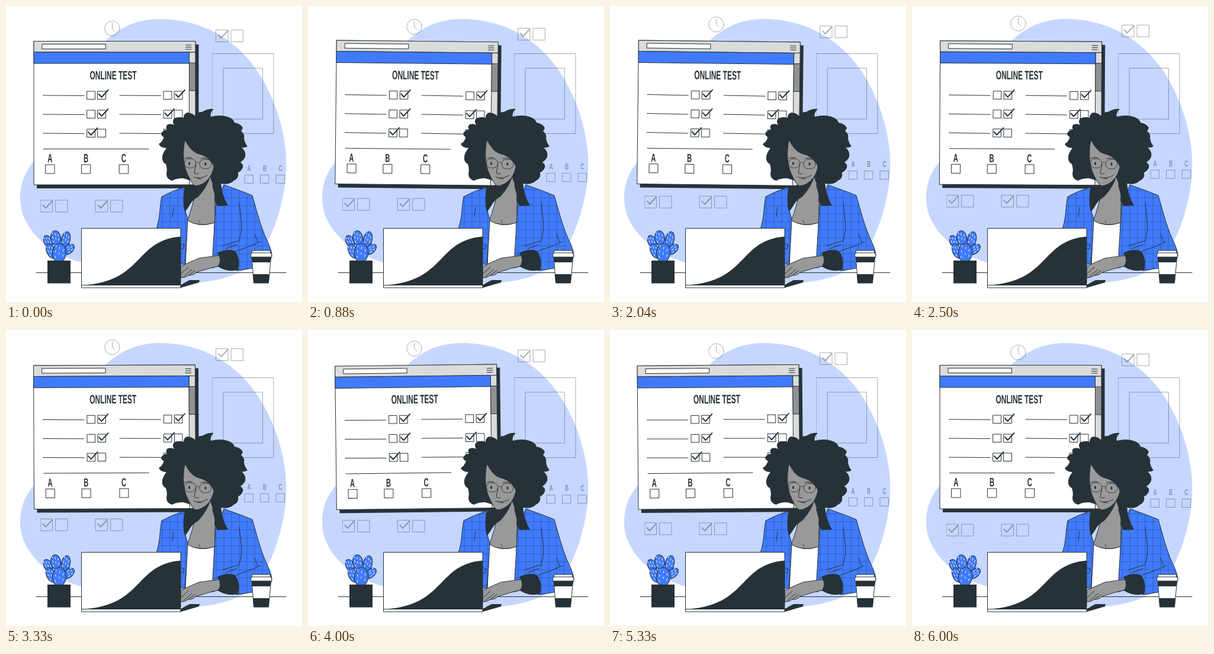
An HTML page for the animation above (6.04 s loop, 500x500 px).

```html
<!DOCTYPE html>
<html lang="en">
<head>
<meta charset="utf-8">
<title>Online test</title>
<style>
html, body { margin: 0; width: 100%; height: 100%; overflow: hidden; background: #fff; }
svg { display: block; width: 100vw; height: 100vh; }
text { font-family: "Liberation Sans", Arial, sans-serif; font-weight: bold; text-anchor: middle; }
.line { fill: none; stroke: #263238; stroke-linecap: round; stroke-linejoin: round; }
.edge { stroke: #263238; stroke-linejoin: round; }
.ink { fill: #263238; }
.skin { fill: #999; }
.blue { fill: #407bff; }
.white { fill: #fff; }
.gray { fill: #dbdbdb; }
.faint { opacity: .4; }
</style>
</head>
<body>
<svg viewBox="0 0 500 500">
  <defs>
    <pattern id="plaid" width="13" height="13.5" x="258" y="317" patternUnits="userSpaceOnUse">
      <rect width="13" height="13.5" fill="#407bff"/>
      <path d="M6 0V13.5M0 7H13" stroke="#263238" stroke-width=".7" opacity=".55"/>
    </pattern>
  </defs>

  <path fill="#c6d7ff" d="M260 22C335 22 398 61 434 125C465 180 476 238 473 282C470 333 451 391 426 425C404 454 355 469 294 468C225 467 170 447 127 433C78 420 24 379 24 325C24 294 36 274 52 257C88 225 125 185 134 128C141 83 163 61 181 48C205 30 230 22 260 22Z"/>

  <g class="line faint">
    <rect x="348.5" y="80.5" width="103.5" height="135"/>
    <rect x="367.5" y="105" width="66" height="86"/>
  </g>
  <g id="floating" class="faint">
    <g class="line">
      <circle cx="179.5" cy="38" r="12.7"/>
      <path d="M179.5 29V38L184 42.5"/>
    </g>
  </g>
  <path class="line" d="M51 450.5H473"/>

  <g id="window">
    <path class="ink" d="M52 65H325.500V308H52Z"/>
    <path class="white edge" d="M47 59.500H320V302H47Z"/>
    <path class="gray edge" d="M309.500 78H320V302H309.500Z"/>
    <path class="edge" fill="#919191" d="M309.500 96H320V143H309.500Z"/>
    <path class="gray edge" d="M47 59.500H320V78H47Z"/>
    <path class="blue edge" d="M47 78H309.500V97H47Z"/>
    <path class="white edge" d="M61 64.500H168.500V72.500H61Z"/>
    <path class="line" d="M303.500 66H313M303.500 69.500H313M303.500 73H313M63.500 241.500H241"/>
  </g>

  <g id="plant">
    <g id="leaves"></g>
    <path class="ink" d="M70 430H109V468.500H70Z"/>
  </g>

  <g id="person">
    <path class="ink" d="M299 291Q287 291 281 295Q271 293 271 283Q273 276 270 267Q263 264 264 254Q265 248 271 240Q261 240 258 233Q264 230 267 221Q262 220 262 215Q266 209 272 209Q269 203 273 200Q280 198 284 201Q280 194 284 190Q293 186 300 189Q300 182 306 180Q314 180 320 186Q323 178 331 179Q341 173 351 174Q344 180 346 187Q362 183 374 187Q384 190 386 197Q397 199 400 206Q399 209 397 211Q404 217 402 223Q403 231 408 237Q403 240 398 239Q406 246 404 255Q401 261 396 264Q403 269 399 275Q396 280 392 281Q394 291 385 295Q377 303 363 300L352 306L330 300Z"/>
    <path class="skin edge" d="M343 283L353 310V366Q328 374 306 363Q315 340 323 303Z"/>
    <path class="white edge" d="M306 362Q327 375 352 366V442H303Z"/>
    <g class="edge" fill="url(#plaid)">
      <path d="M301 306Q279 313 263 322C259 340 261 358 253 379L294 436H302L305 400L307 360L301 340Z"/>
      <path d="M368 302Q399 313 416 320C424 347 429 369 440 394Q448 410 449 420C449 431 436 437 421 442Q406 445 390 447L382 440H351L349 421L354 336Z"/>
    </g>
    <path class="line" d="M283 340L281 356M394 333L397 360Q400 378 393 398M420 385L425 399M389 414Q411 407 430 398M366 405L392 397M371 410L390 403M277 398L301 403L299 411L284 405"/>
    <path class="ink" d="M320 301L302 307Q297 326 302 348Q310 339 316 324L328 313Z"/>
    <path class="ink" d="M318 302Q336 299 346 285Q341 305 325 322Q313 329 308 340Z"/>
    <path class="ink" d="M348 302L363 298Q365 321 375 337L358 338Q350 331 353 321Z"/>
    <path class="skin edge" d="M302 227C298 247 299 270 307 285Q314 301 320 304Q333 303 343 291Q351 280 353 262Z"/>
    <path class="ink" d="M300 222L303 228Q311 244 322 249Q341 254 347 264Q355 275 351 299L378 285L378 220Z"/>
    <g class="line">
      <path d="M302 258Q308 254 314 257M329 258Q335 255 342 259M321 267L318 282Q321 285 325 283M317 289Q329 293 340 286M323 291L330 292"/>
      <g stroke-width=".8">
        <rect x="301.500" y="258" width="19" height="15.500" rx="7.500"/>
        <rect x="327" y="259" width="20" height="16" rx="8"/>
        <path d="M320.500 265Q324 262 327 266M347 265L354 264M328 367L326 362"/>
      </g>
    </g>
    <ellipse class="ink" cx="309.500" cy="266" rx="1.500" ry="2.800"/>
    <ellipse class="ink" cx="337" cy="267" rx="1.500" ry="2.800"/>
  </g>

  <g id="laptop">
    <path class="ink" d="M295 471L310 463H327L326 467L295 476Z"/>
    <path class="skin edge" d="M363 421Q340 424 326 426Q309 433 295 440V459Q302 460 308 455Q315 456 321 450Q341 443 365 438Z"/>
    <path class="line" d="M296 452L308 441M300 457L314 445M308 455L319 447"/>
    <path class="ink" d="M357 417Q374 409 387 414Q397 428 392 446Q372 450 358 440Q365 429 357 417Z"/>
    <path class="white edge" d="M127.500 375.500H295V476H127.500Z"/>
    <path class="ink" d="M130 471.500C232 466 218 395 295 389.500V471.500Z"/>
    <path class="line" d="M127.500 471.500H295"/>
  </g>

  <g id="cup">
    <path class="white edge" d="M415 421L418.500 468H443.500L448 421Z"/>
    <path class="ink" d="M415 424H447.500L446.500 433H416ZM417 453H445L443.500 468H418.500Z"/>
    <path class="white edge" d="M416 413H446L447 417Q449 418 449 424H413.500Q413.500 418 415 417Z"/>
    <path class="line" d="M415 417H447"/>
  </g>
</svg>
<script>
const LOOP = 6040, CYCLE = 6000;
const byId = id => document.getElementById(id);
const pane = byId('window'), floating = byId('floating');

function add(parent, tag, attrs, content) {
  const node = document.createElementNS('http://www.w3.org/2000/svg', tag);
  for (const key in attrs) node.setAttribute(key, attrs[key]);
  if (content) node.textContent = content;
  return parent.appendChild(node);
}

const path = (parent, d, width = 1) =>
  add(parent, 'path', { class: 'line', d, 'stroke-width': width });

const box = (parent, x, y, size) =>
  add(parent, 'rect', { class: 'line', x, y, width: size, height: size });

const tick = (parent, x, y, width, size = 1) =>
  path(parent, `M${x} ${y}l${4.5 * size} ${5 * size}l${11 * size} ${-12 * size}`, width);

// Tall, narrow lettering shared by every label.
const label = (parent, content, x, y, size) =>
  add(parent, 'text', { class: 'ink', transform: `translate(${x} ${y}) scale(.575 1)`, 'font-size': size }, content);

function buildWindow() {
  label(pane, 'ONLINE TEST', 181, 124, 20.8);
  [151, 183, 215].forEach((y, row) => {
    [62.5, 192].forEach((x, column) => {
      path(pane, `M${x} ${y}l69.500 .5`);
      box(pane, x + 74.5, y - 7, 13.5);
      box(pane, x + 92.5, y - 7, 13.5);
      const second = row === 0 || (row === 1 && column === 0);
      tick(pane, x + (second ? 94.5 : 76.5), y - 2, 2);
    });
  });
  [['A', 74.2], ['B', 135], ['C', 198.8]].forEach(([letter, x]) => {
    label(pane, letter, x, 264, 19.5);
    box(pane, x - 7.2, 268, 15);
  });
}

function buildFloating() {
  [[355, 40.5, 1], [58.5, 328, 1], [151.5, 328, 1]].forEach(([x, y]) => {
    box(floating, x, y, 20);
    box(floating, x + 25.5, y, 20);
    tick(floating, x + 4, y + 8.5, 2);
  });
  [['A', 410.7], ['B', 437.2], ['C', 463.7]].forEach(([letter, x]) => {
    label(floating, letter, x, 279, 15);
    box(floating, x - 7.2, 285.5, 14);
  });
}

function buildPlant() {
  const leaves = byId('leaves');
  // x, y, half width, half height, tilt
  [[71, 398, 7, 11, -25], [84, 392, 8.5, 12.5, -8], [101, 394, 7.5, 13, 12],
   [106, 411, 7, 11, 48], [76, 414, 7.5, 13, -25], [90, 417, 11.5, 16, 4]]
    .forEach(([x, y, rx, ry, tilt]) => {
      const leaf = add(leaves, 'g', { transform: `translate(${x} ${y}) rotate(${tilt})` });
      add(leaf, 'ellipse', { class: 'blue edge', rx, ry });
      for (let i = 0; i < 7; i++) {
        const px = ((i % 3) - 1) * rx * .52, py = (i / 3 - 1) * ry * .58;
        add(leaf, 'path', { d: `M${px} ${py}l${px * .12} -3.500`, stroke: '#fff', 'stroke-width': 1 });
      }
    });
}

function render(time) {
  const p = Math.min(time % LOOP / CYCLE, 1);
  const angle = p < .25 ? 4 * p : p < .75 ? 2 - 4 * p : 4 * p - 4;
  const lift = -10 * (1 - Math.abs(1 - 2 * p));
  pane.setAttribute('transform', `rotate(${angle} 186 183.5)`);
  floating.setAttribute('transform', `translate(0 ${lift})`);
}

buildWindow();
buildFloating();
buildPlant();
render(0);

let start;
function frame(now) {
  start ??= now;
  render(now - start);
  requestAnimationFrame(frame);
}
requestAnimationFrame(frame);
</script>
</body>
</html>
```
